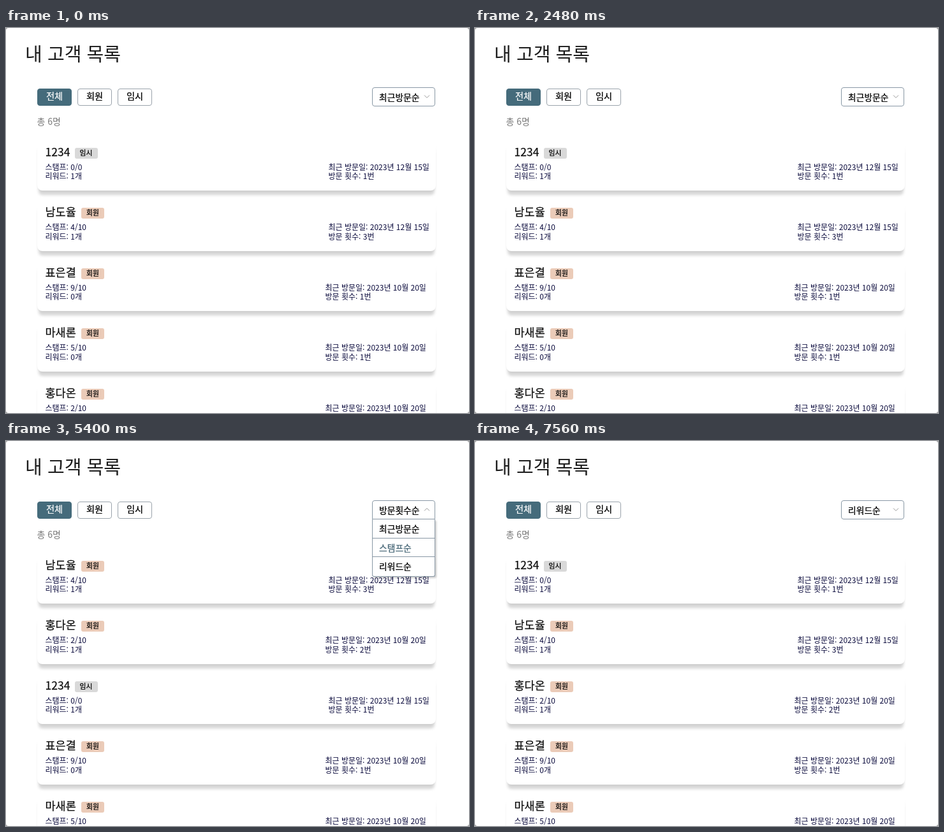
An HTML page for the animation above (8080 ms loop, 726x604 px).

```html
<!DOCTYPE html>
<html lang="ko">
<head>
<meta charset="utf-8">
<title>내 고객 목록</title>
<style>
  * { box-sizing: border-box; }
  html, body { margin: 0; width: 100%; height: 100%; overflow: hidden; background: #999; }
  #view {
    position: relative; width: 726px; height: 604px; overflow: hidden;
    background: #fff; border-radius: 4px;
    font-family: "Noto Sans CJK KR", "Noto Sans CJK", "Noto Sans", sans-serif;
    color: #111; white-space: nowrap;
  }
  #view > *, .card > * { position: absolute; }
  h1 { left: 30px; top: 19px; margin: 0; font-size: 29.1px; font-weight: 400; line-height: 40px; color: #1c1c1c; }
  .tab, .name, .badge, #head, #menu { -webkit-text-stroke: .25px currentColor; }
  .tab {
    top: 95px; width: 54px; height: 27px; border: 1px solid #9aa3ab; border-radius: 4px;
    font-size: 14.2px; line-height: 21px; text-align: center; color: #000;
  }
  .tab.hover { color: #777; border-color: #bbb; }
  .tab.on { background: #456b7b; border-color: #456b7b; color: #fff; font-weight: 500; }
  #count { left: 48.5px; top: 136px; font-size: 14px; line-height: 20px; color: #777; }
  .card {
    left: 49px; width: 625px; height: 77px; border-radius: 8px; background: #fff;
    box-shadow: 0 9px 4px -2px rgba(0, 0, 0, .16), 0 2px 2px rgba(0, 0, 0, .03);
  }
  .name { left: 12.5px; top: 5.5px; font-size: 17.5px; font-weight: 500; line-height: 20px; }
  .badge {
    top: 9.5px; width: 36px; height: 17px; border-radius: 3px; background: #ebcbb8;
    font-size: 10.8px; line-height: 15px; text-align: center; color: #000;
  }
  .badge.temp { background: #d9d9d9; }
  .info { top: 32.9px; font-size: 12px; line-height: 14.6px; color: #0a0a3c; }
  #head, #menu { left: 574px; width: 99px; border: 1px solid #8998a5; background: #fff; font-size: 13.8px; color: #000; }
  #head { top: 93px; height: 30px; padding-left: 10px; border-radius: 4px; line-height: 28px; }
  #head svg { position: absolute; left: 80px; top: 10px; }
  #menu {
    top: 123px; overflow: hidden; border-top: 0; border-radius: 0 0 3px 3px;
    box-shadow: 2px 2px 3px rgba(0, 0, 0, .2);
  }
  #menu div { height: 29.7px; padding-left: 10px; border-bottom: 1px solid #8998a5; line-height: 29px; }
  #menu div:last-child { border-bottom: 0; }
  .hot { color: #456575 !important; }
  #hand { left: 71px; top: 116px; filter: drop-shadow(0 2px 1px rgba(0, 0, 0, .35)); }
</style>
</head>
<body>
<div id="view">
  <h1>내 고객 목록</h1>
  <div id="count"></div>
  <div id="head"><span id="label"></span>
    <svg width="10" height="8" viewBox="0 0 10 8"><path id="arrow" fill="none" stroke="#999"/></svg>
  </div>
  <div id="menu"></div>
  <svg id="hand" width="32" height="37" viewBox="0 0 32 37">
    <path d="M6 4C6 0 11 0 12 3L15 12C15 9 19 9 20 12C21 9 24 10 24 13C26 11 28 12 28 15L29 22C29 26 26 28 26 31L13 33C11 28 5 24 1 19C0 16 4 14 7 17L10 20Z"
      fill="#fff" stroke="#000" stroke-width="2" stroke-linejoin="round"/>
    <path d="M14.5 19L16 27M18.5 19L19.5 27M22.5 18L23.5 26" stroke="#000" stroke-width="1.8" stroke-linecap="round"/>
  </svg>
</div>
<script>
const LOOP = 8080, SLIDE = 300, MENU_H = 89.5, PITCH = 94.5;
const $ = id => document.getElementById(id);
const view = $('view');
const tabNames = ['전체', '회원', '임시'];
const sorts = ['최근방문순', '방문횟수순', '스탬프순', '리워드순'];

// name, stamps, rewards, date, visits, left edge of the visit text
const people = [
  ['1234', '0/0', 1, '12월 15일', 1, 506],
  ['남도율', '4/10', 1, '12월 15일', 3, 506],
  ['표은결', '9/10', 0, '10월 20일', 1, 501],
  ['마새론', '5/10', 0, '10월 20일', 1, 501],
  ['홍다온', '2/10', 1, '10월 20일', 2, 501],
  ['탁이솜', '6/10', 0, '10월 16일', 1, 504]
];
const orders = ['012345', '140235', '253140', '014235'];

// state changes over one loop; hot: 0 = select head, 1..3 = option
const steps = [
  [0, { tab: 0, hover: -1, sort: 0, hot: -1, hand: false }],
  [480, { hover: 1 }],
  [760, { tab: 1, hover: -1 }],
  [1320, { hover: 2 }],
  [1400, { tab: 2, hover: -1 }],
  [2160, { hover: 0 }],
  [2200, { hand: true }],
  [2280, { tab: 0, hover: -1, hand: false }],
  [3080, { hot: 0 }],
  [3520, { hot: 1 }],
  [3760, { sort: 1, hot: -1 }],
  [4780, { hot: 0 }],
  [5160, { hot: 1 }],
  [5280, { hot: 2 }],
  [5440, { sort: 2, hot: -1 }],
  [6160, { hot: 0 }],
  [6520, { hot: 1 }],
  [6640, { hot: 2 }],
  [6760, { hot: 3 }],
  [7000, { sort: 3, hot: -1 }]
];
const openings = [[3050, 3760], [4730, 5440], [6130, 7000]];

const tabs = tabNames.map((text, i) => {
  const el = document.createElement('div');
  el.textContent = text;
  el.style.left = 49 + 63 * i + 'px';
  view.insertBefore(el, $('count'));
  return el;
});

const list = document.createElement('div');
list.style.cssText = 'left:0;top:0';
view.insertBefore(list, $('head'));

function card(id, row) {
  const [name, stamps, rewards, date, visits, x] = people[id];
  const temp = id === 0;
  return `<div class="card" style="position:absolute;top:${178 + row * PITCH}px">
    <div class="name">${name}</div>
    <div class="badge${temp ? ' temp' : ''}" style="left:${temp ? 58.5 : 69}px">${temp ? '임시' : '회원'}</div>
    <div class="info" style="left:12.5px">스탬프: ${stamps}<br>리워드: ${rewards}개</div>
    <div class="info" style="left:${x - 49.5}px">최근 방문일: 2023년 ${date}<br>방문 횟수: ${visits}번</div>
  </div>`;
}

function render(s) {
  tabs.forEach((el, i) => {
    el.className = 'tab' + (i === s.tab ? ' on' : i === s.hover ? ' hover' : '');
  });
  const ids = [...orders[s.sort]].map(Number)
    .filter(id => s.tab === 0 || (s.tab === 2) === (id === 0));
  $('count').textContent = `총 ${ids.length}명`;
  list.innerHTML = ids.map(card).join('');
  $('label').textContent = sorts[s.sort];
  $('label').className = s.hot === 0 ? 'hot' : '';
  $('menu').innerHTML = sorts.filter((_, i) => i !== s.sort)
    .map((text, i) => `<div class="${s.hot === i + 1 ? 'hot' : ''}">${text}</div>`).join('');
  $('hand').style.display = s.hand ? 'block' : 'none';
}

const ease = p => {
  p = Math.min(1, Math.max(0, p));
  return p * p * (3 - 2 * p);
};

function drawMenu(t) {
  let open = 0, up = false;
  for (const [from, to] of openings) {
    open += ease((t - from) / SLIDE) - ease((t - to) / SLIDE);
    up = up || (t > from + 50 && t < to);
  }
  const shown = open > 0.001;
  $('menu').style.display = shown ? 'block' : 'none';
  $('menu').style.height = open * MENU_H + 'px';
  $('head').style.borderRadius = shown ? '4px 4px 0 0' : '4px';
  $('arrow').setAttribute('d', up ? 'M1 5.5L5 1.5L9 5.5' : 'M1 1.5L5 5.5L9 1.5');
}

const start = performance.now();
let last = -1;
function frame() {
  const t = (performance.now() - start) % LOOP;
  const n = steps.filter(([at]) => at <= t).length;
  if (n !== last) {
    last = n;
    render(Object.assign({}, ...steps.slice(0, n).map(step => step[1])));
  }
  drawMenu(t);
  requestAnimationFrame(frame);
}
frame();
</script>
</body>
</html>
```
